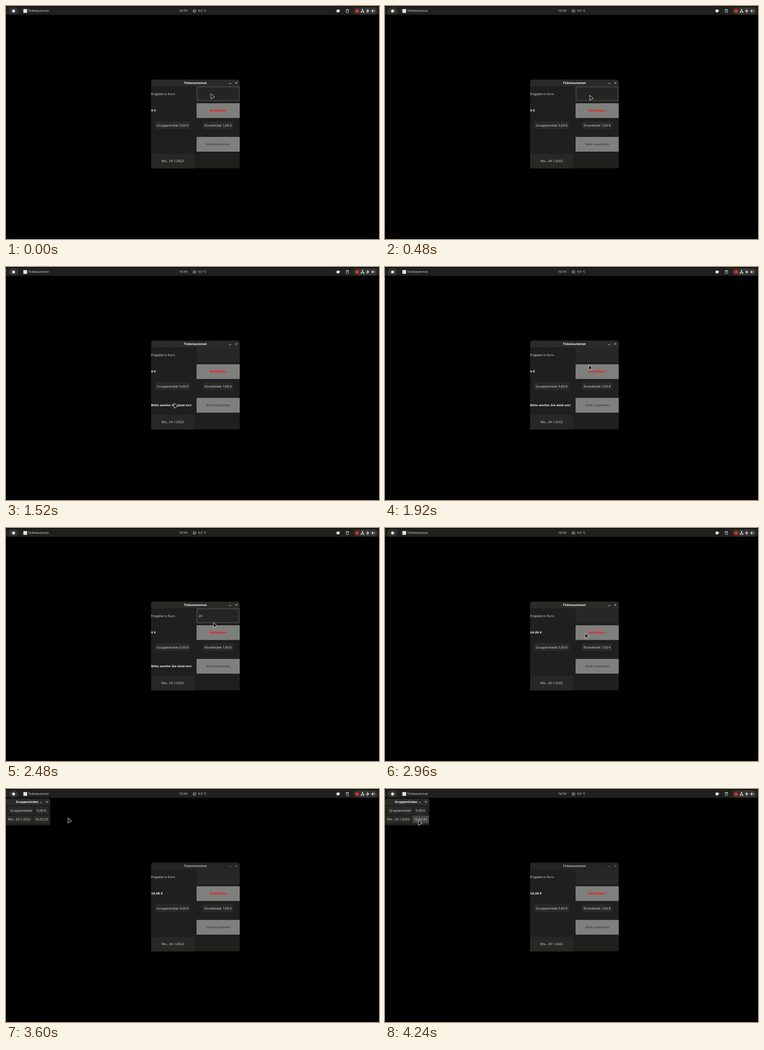
These frames come from a looping animation (640 by 400 pixels, 4.32 s). An HTML page with a canvas:

```html
<!DOCTYPE html>
<html lang="de">
<head>
<meta charset="utf-8">
<title>Ticketautomat</title>
<style>
html, body { margin: 0; width: 100%; height: 100%; overflow: hidden; background: #000; }
canvas { display: block; width: 640px; height: 400px; }
</style>
</head>
<body>
<canvas id="stage" width="640" height="400"></canvas>
<script>
const ctx = document.getElementById('stage').getContext('2d');
const LOOP = 4320, STEP = 80;
const UI = '"Open Sans", "Noto Sans", sans-serif';
const LABEL = '"DejaVu Sans", sans-serif';
const WHITE = '#e4e4e2', PANEL = '#1f1f1e', CELL = '#272726';

// When the state of the machine changes, in ms
const REJECT = 960, FOCUS = 2000, FIRST_DIGIT = 2160, SECOND_DIGIT = 2400,
  ACCEPT = 2800, BUY = 3440, TICKET_OPEN = 3520;

// Pointer moves between rests
const HOME = { x: 352, y: 151 };
const MOVES = [
  { from: 400, to: 800, x: 347, y: 175 },
  { from: REJECT, to: 1520, x: 288.5, y: 234 },
  { from: 1600, to: FOCUS, x: 357, y: 161 },
  { from: SECOND_DIGIT, to: ACCEPT, x: 350, y: 178 },
  { from: 2880, to: 3280, x: 287, y: 206 },
  { from: BUY, to: 3600, x: 106.5, y: 50 },
  { from: 3600, to: 4000, x: 26, y: 46 },
  { from: 4000, to: 4240, x: 57.5, y: 54 }
];

function pointerAt(t) {
  return MOVES.reduce((p, move) => {
    const k = Math.min(1, Math.max(0, (t - move.from) / (move.to - move.from)));
    const ease = k * k * (3 - 2 * k);
    return { x: p.x + (move.x - p.x) * ease, y: p.y + (move.y - p.y) * ease };
  }, HOME);
}

function rect(x, y, w, h, fill, radius = 0) {
  ctx.fillStyle = fill;
  ctx.beginPath();
  ctx.roundRect(x, y, w, h, radius);
  ctx.fill();
}

function box(cx, cy, w, h, fill, radius) {
  rect(cx - w / 2, cy - h / 2, w, h, fill, radius);
}

function disc(x, y, r, fill) {
  box(x, y, 2 * r, 2 * r, fill, r);
}

function line(x0, y0, x1, y1, color, width = 0.8) {
  ctx.strokeStyle = color;
  ctx.lineWidth = width;
  ctx.beginPath();
  ctx.moveTo(x0, y0);
  ctx.lineTo(x1, y1);
  ctx.stroke();
}

function arc(x, y, r, from, to, color) {
  ctx.strokeStyle = color;
  ctx.lineWidth = 0.8;
  ctx.beginPath();
  ctx.arc(x, y, r, from, to);
  ctx.stroke();
}

// Text is placed by the middle of its line
function text(str, x, y, { size = 5.65, weight = 400, family = UI, color = '#dededc', align = 'left' } = {}) {
  ctx.font = `${weight} ${size}px ${family}`;
  ctx.fillStyle = color;
  ctx.textAlign = align;
  ctx.fillText(str, x, y + size * 0.36);
  return ctx.measureText(str).width;
}

function boldLabel(str, x, y, color = '#f4f4f4', align = 'left') {
  text(str, x, y, { size: 4.8, weight: 700, family: LABEL, color, align });
}

function button(str, cx, cy, pointer) {
  const options = { align: 'center' };
  const w = text(str, cx, cy, options) + 6, h = 13.5;
  const hover = Math.abs(pointer.x - cx) < w / 2 && Math.abs(pointer.y - cy) < h / 2;
  box(cx, cy, w, h, hover ? '#444443' : '#292928', 2);
  text(str, cx, cy, options);
}

function frame(title, x, y, w, h, active, titleX = x + w / 2) {
  const corners = [4, 4, 0, 0], cx = x + w - 5.8, cy = y + 5.7;
  rect(x, y, w, h, PANEL, corners);
  rect(x, y, w, 11.5, active ? '#2a2a29' : '#252524', corners);
  text(title, titleX, cy, { size: 5.35, weight: 700, color: active ? '#f4f4f4' : '#b4b4b2', align: 'center' });
  const mark = active ? '#d0d0ce' : '#8c8c8a';
  line(cx - 12.2, cy + 1, cx - 8.7, cy + 1, mark);
  for (const d of [-1.5, 1.5]) line(cx - 1.5, cy - d, cx + 1.5, cy + d, mark);
}

function topBar() {
  const y = 8.5;
  rect(0, 0.7, 640, 14.6, '#20201f', 3);
  box(13, y, 16, 12, '#343433', 6);
  disc(13, y, 2.6, WHITE);
  box(33, y, 6.5, 6.5, WHITE);
  text('Ticketautomat', 38, y, { size: 5.3 });
  text('16:54', 304, y, { size: 5.5, align: 'center' });
  text('4,5 °C', 329.5, y, { size: 5.3 });
  arc(323.5, y, 2.4, 0, Math.PI * 2, '#c8c8c6');
  line(321.5, y, 324, y, '#c8c8c6');

  // Cup and clipboard
  box(569.5, y, 4.6, 5, WHITE, 1.5);
  disc(571.5, 8, 1.5, WHITE);
  box(585.8, y, 5, 6, '#b8b8b6', 1);
  box(585.8, y + 0.5, 3, 3.5, PANEL);

  // System tray
  box(616.5, y, 41, 12, '#343433', 6);
  disc(602.5, y, 3.6, '#6b2418');
  disc(602.5, y, 2.6, '#e23a18');
  box(611.8, 6.5, 2.2, 2, WHITE);
  line(611.8, 7, 611.8, 9.5, WHITE);
  line(609.5, 9.3, 614.1, 9.3, WHITE);
  for (const x of [609.8, 613.8]) box(x, 10.5, 2, 1.8, WHITE);
  line(617.7, y, 623.4, y, WHITE, 1);
  for (const d of [-3, 3]) line(621.5, y, 619.8, y + d, WHITE, 1.2);
  box(628, y, 1.6, 2.2, WHITE);
  box(629.4, y, 1.4, 4.6, WHITE);
  arc(630.3, y, 2.2, -1, 1, WHITE);
}

function machine(t, pointer) {
  const left = 249, right = 327, colW = 74, rowH = 25.3;
  const leftMid = left + colW / 2, rightMid = right + colW / 2;
  const row = i => 150.7 + 28.9 * i;

  const grayButton = (str, y, color) => {
    box(rightMid, y, colW, rowH, '#7f7f7e');
    boldLabel(str, rightMid, y, color, 'center');
  };

  frame('Ticketautomat', left, 126.4, 152, 152.2, t < BUY);
  text('Eingabe in Euro', left, row(0));

  const focused = t < REJECT || (t >= FOCUS && t < ACCEPT);
  box(rightMid, row(0), colW, rowH, focused ? '#464644' : CELL, 1);
  if (focused) box(rightMid, row(0), colW - 3, rowH - 3, '#252524', 1);
  if (t >= FIRST_DIGIT && t < ACCEPT) text(t < SECOND_DIGIT ? '2' : '24', right + 3.5, row(0));

  boldLabel(t < ACCEPT ? '0 €' : t < BUY ? '24,00 €' : '19,00 €', left, row(1));
  grayButton('Bestätigen', row(1), '#fa1212');

  button('Gruppenticket 5,00 €', leftMid, row(2) - 4, pointer);
  button('Einzelticket 1,00 €', rightMid, row(2) - 4, pointer);

  if (t >= REJECT && t < ACCEPT) boldLabel('Bitte werfen Sie Geld ein!', left, row(3));
  grayButton('Geld auszahlen', row(3), '#474746');

  box(leftMid, row(4), colW, rowH, CELL);
  text('Mo., 24.1.2022', leftMid, row(4), { align: 'center' });
}

function ticket(t, pointer) {
  if (t < BUY) return;
  const leftMid = 25, rightMid = 61, top = 36.8, bottom = 52.3;
  ctx.save();
  if (t < TICKET_OPEN) {
    ctx.globalAlpha = 0.5;
    ctx.translate(2.3, 2.4);
    ctx.scale(0.94, 0.94);
  }
  frame('Gruppenticket', 0, 16.4, 76, 46.2, true, 36);
  button('Gruppenticket', leftMid + 1, top, pointer);
  button('5,00 €', rightMid, top, pointer);
  button('Mo., 24.1.2022', leftMid - 2, bottom, pointer);
  button('16:53:22', rightMid, bottom, pointer);
  ctx.restore();
}

function drawPointer({ x, y }) {
  ctx.beginPath();
  ctx.moveTo(x, y + 0.3);
  ctx.lineTo(x + 5.4, y + 5.2);
  ctx.lineTo(x + 2.6, y + 5.8);
  ctx.lineTo(x + 0.4, y + 8);
  ctx.closePath();
  ctx.lineJoin = 'round';
  ctx.strokeStyle = '#dcdcdc';
  ctx.lineWidth = 1.5;
  ctx.stroke();
  ctx.fillStyle = '#080808';
  ctx.fill();
}

function draw(t) {
  const pointer = pointerAt(t);
  rect(0, 0, 640, 400, '#000');
  topBar();
  machine(t, pointer);
  ticket(t, pointer);
  drawPointer(pointer);
}

const start = performance.now();
function tick() {
  const t = (performance.now() - start) % LOOP;
  draw(Math.floor(t / STEP) * STEP);
  requestAnimationFrame(tick);
}
tick();
</script>
</body>
</html>
```
